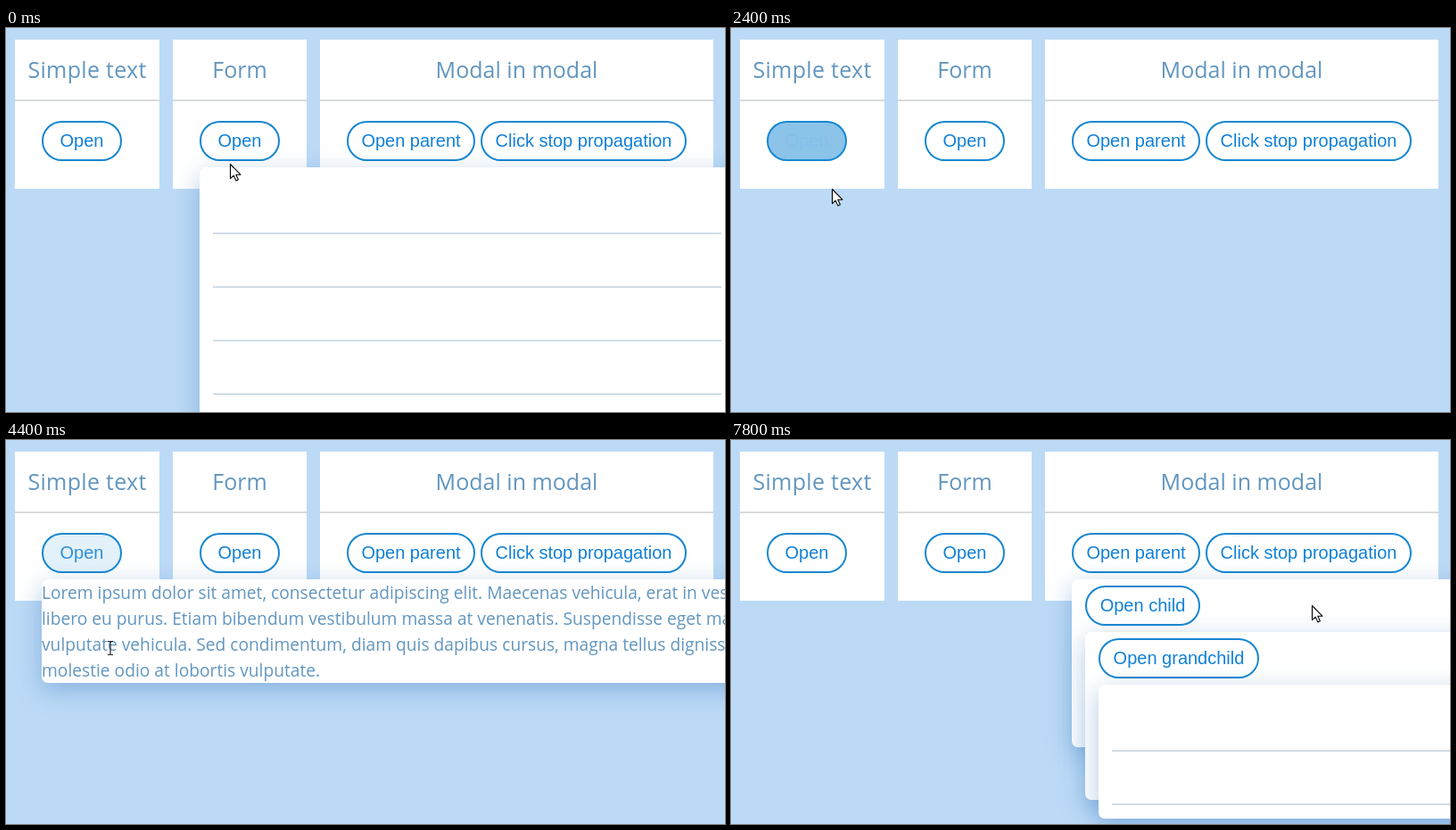
Animation of 806x430 px, one loop 8 s. Source, as an HTML page:

```html
<!DOCTYPE html>
<html lang="en">
<head>
<meta charset="utf-8">
<title>Modal windows</title>
<style>
  html, body { margin: 0; width: 100%; height: 100%; overflow: hidden; background: #bcdaf6; }
  svg { display: block; width: 806px; height: 430px; }
  .title { font: 25px "Open Sans", "Noto Sans", sans-serif; fill: #6296bf; text-anchor: middle; }
  .copy { font: 19.2px "Open Sans", "Noto Sans", sans-serif; fill: #6296bf; }
  .label { font: 20px "Liberation Sans", Arial, sans-serif; text-anchor: middle; }
  .pill { stroke: #1787d0; stroke-width: 2; }
  .sheet { fill: #fff; filter: drop-shadow(0 8px 14px rgba(30, 100, 180, .34)); }
  .rule { fill: #d0dde7; }
  .pointer { fill: #fff; stroke: #000; stroke-width: 1.1; stroke-linejoin: round; }
</style>
</head>
<body>
<svg id="stage" viewBox="0 0 806 430"></svg>
<script>
const NS = 'http://www.w3.org/2000/svg';
const stage = document.getElementById('stage');
const STEP = 200, STEPS = 40;

function add(parent, tag, attrs, text) {
  const el = document.createElementNS(NS, tag);
  for (const key in attrs) el.setAttribute(key, attrs[key]);
  if (text) el.textContent = text;
  parent.appendChild(el);
  return el;
}

const mix = (a, b, k) => `rgb(${a.map((v, i) => Math.round(v + (b[i] - v) * k))})`;

function card(x, width, title, spacing = 0) {
  add(stage, 'rect', { x, y: 13, width, height: 167, fill: '#fff' });
  add(stage, 'rect', { x, y: 80.4, width, height: 1.4, fill: '#c9cccf' });
  add(stage, 'text', { x: x + width / 2, y: 56, class: 'title', 'letter-spacing': spacing }, title);
}

// A pill button; clicks lists the steps at which it flashes.
function button(parent, x, y, width, text, clicks = []) {
  const pill = add(parent, 'rect', {
    x: x + 1, y: y + 1, width: width - 2, height: 43, rx: 21.5, class: 'pill'
  });
  const label = add(parent, 'text', { x: x + width / 2, y: y + 29, class: 'label' }, text);
  return { pill, label, clicks };
}

function modal(x, y, height, spans, firstRule, rules, ruleEnd = 806) {
  const el = add(stage, 'g');
  add(el, 'rect', { x, y, width: 900 - x, height, rx: 7, class: 'sheet' });
  for (let i = 0; i < rules; i++) {
    add(el, 'rect', {
      x: x + 15, y: y + firstRule + i * 60, width: ruleEnd - x - 15, height: 2, class: 'rule'
    });
  }
  return { el, spans };
}

card(10, 162, 'Simple text', .3);
card(187, 150, 'Form');
card(352, 441, 'Modal in modal');

const buttons = [
  button(stage, 40, 104, 90, 'Open', [3, 12, 17, 20]),
  button(stage, 217, 104, 90, 'Open', [8, 14]),
  button(stage, 382, 104, 144, 'Open parent', [28]),
  button(stage, 532, 104, 231, 'Click stop propagation')
];

const form = modal(217, 156, 330, [[0, 3], [9, 12], [15, 17]], 73, 4, 802);
const simple = modal(40, 156, 116, [[21, 26]], 0, 0);
[
  'Lorem ipsum dolor sit amet, consectetur adipiscing elit. Maecenas vehicula, erat in vestibulum',
  'libero eu purus. Etiam bibendum vestibulum massa at venenatis. Suspendisse eget massa',
  'vulputate vehicula. Sed condimentum, diam quis dapibus cursus, magna tellus dignissim',
  'molestie odio at lobortis vulputate.'
].forEach((line, i) => add(simple.el, 'text', { x: 40, y: 178 + i * 29, class: 'copy' }, line));

const parent = modal(382, 156, 188, [[29, STEPS]], 111, 2);
buttons.push(button(parent.el, 397, 163, 129, 'Open child', [30]));
const child = modal(397, 215, 188, [[31, STEPS]], 111, 2);
buttons.push(button(child.el, 412, 222, 180, 'Open grandchild', [32]));
const grandchild = modal(412, 274, 150, [[33, STEPS]], 73, 2);
const modals = [form, simple, parent, child, grandchild];

const pointers = {
  arrow: add(stage, 'path', {
    class: 'pointer', d: 'M.5 .5V16.6l3.7-3.5 2.6 5.8 2.6-1.1-2.6-5.6h5.1z'
  }),
  hand: add(stage, 'g', { class: 'pointer' }),
  beam: add(stage, 'path', {
    d: 'M-3 -7.5h2.2l.8 .8 .8-.8h2.2M0 -7V7M-3 7.5h2.2l.8-.8 .8 .8h2.2',
    fill: 'none', stroke: '#222', 'stroke-width': 1.2
  })
};
add(pointers.hand, 'path', {
  d: 'M-1.8 13V2a1.9 1.9 0 0 1 3.8 0V8q3-1 3.8 1q3-.8 3.6 1.2q2.4-.2 2.4 2V15q0 2-2 4.5v2H1v-2l-5-7q-.8-2 1-2.2q1 0 1.2 1z'
});
add(pointers.hand, 'path', { d: 'M2 8v3.5M5.8 9v3M9.4 10.2v2.4', fill: 'none' });

// Pointer path: step, shape, x, y
const path = [
  [0, 'arrow', 251, 152], [2, 'arrow', 80, 138], [3, 'hand', 85, 127], [5, 'hand', 92, 130],
  [7, 'hand', 262, 129], [8, 'hand', 266, 126.5], [9, 'hand', 262, 128], [11, 'hand', 88, 130],
  [12, 'arrow', 113, 180], [13, 'hand', 240, 132], [14, 'hand', 262, 128], [15, 'hand', 225, 130],
  [16, 'arrow', 80, 138], [17, 'hand', 85, 130], [20, 'hand', 88, 128], [22, 'beam', 117, 233],
  [24, 'beam', 150, 242], [26, 'arrow', 300, 315], [28, 'hand', 455, 130], [30, 'hand', 459, 188],
  [31, 'hand', 459, 234.5], [33, 'hand', 459, 240], [35, 'beam', 440, 318], [36, 'beam', 431, 332],
  [37, 'arrow', 510, 280], [39, 'arrow', 651, 185]
];

const flash = [1, .84, .24];
const fillOff = [255, 255, 255], fillOn = [139, 195, 233];
const textOff = [17, 128, 214], textOn = [133, 191, 232];

function movePointer(step) {
  let i = path.length - 1;
  while (path[i][0] > step) i--;
  const a = path[i], b = path[i + 1] || a;
  const k = a === b ? 0 : (step - a[0]) / (b[0] - a[0]);
  const x = a[2] + (b[2] - a[2]) * k, y = a[3] + (b[3] - a[3]) * k;
  for (const name in pointers) {
    pointers[name].setAttribute('visibility', name === a[1] ? 'visible' : 'hidden');
  }
  pointers[a[1]].setAttribute('transform', `translate(${x} ${y})`);
}

function draw(step) {
  for (const { el, spans } of modals) {
    const open = spans.some(([from, to]) => step >= from && step < to);
    el.setAttribute('display', open ? 'inline' : 'none');
  }
  for (const { pill, label, clicks } of buttons) {
    const k = Math.max(0, ...clicks.map(c => flash[step - c] || 0));
    pill.setAttribute('fill', mix(fillOff, fillOn, k));
    label.setAttribute('fill', mix(textOff, textOn, k));
  }
  movePointer(step);
}

const start = performance.now();
function tick() {
  draw(Math.floor((performance.now() - start) / STEP) % STEPS);
  requestAnimationFrame(tick);
}
tick();
</script>
</body>
</html>
```
